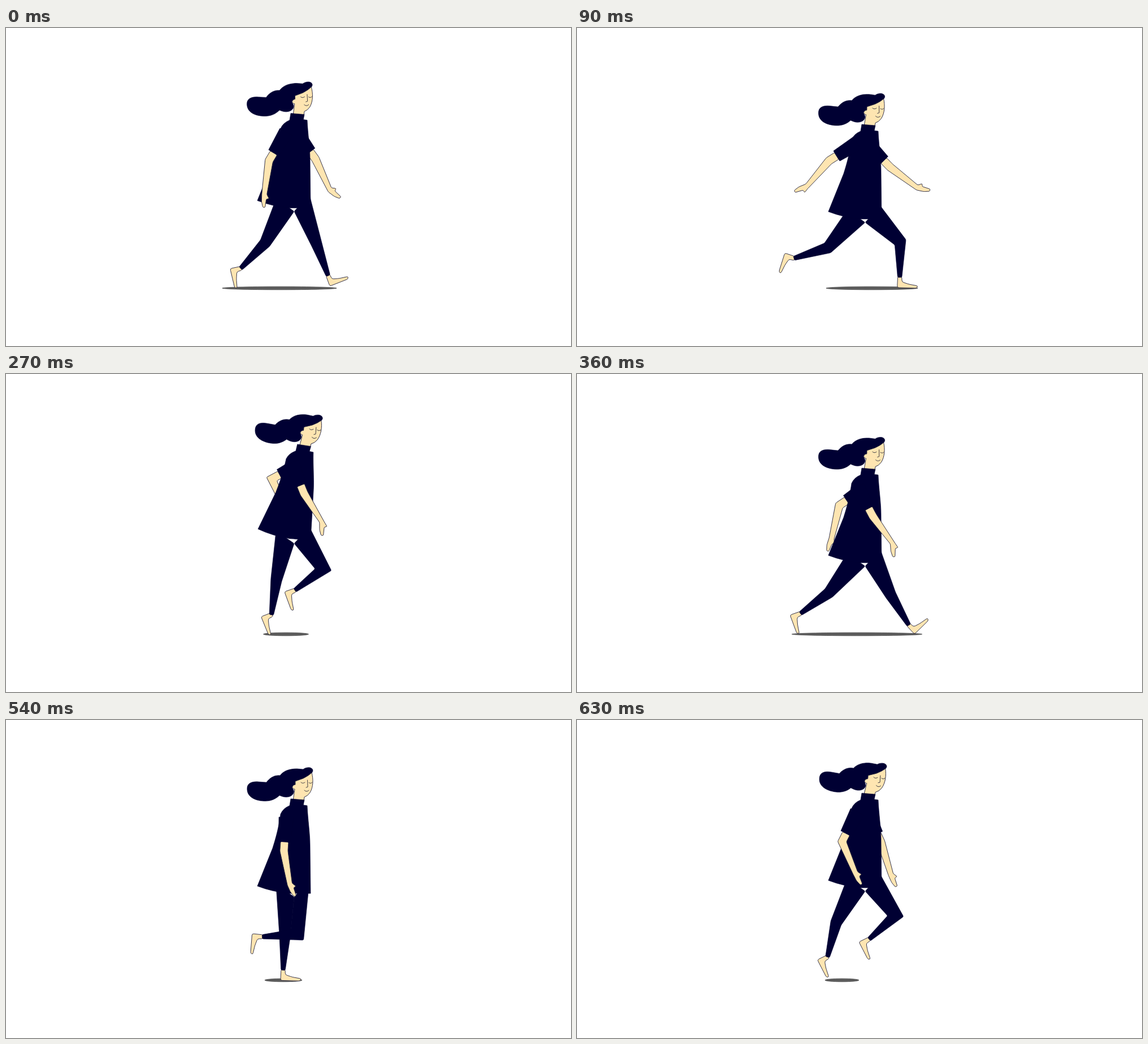
An HTML page that plays this animation: 998x561 px, repeating every 0.72 s.

```html
<!DOCTYPE html>
<html lang="en">
<head>
<meta charset="utf-8">
<title>Walk cycle</title>
<style>
  html, body { margin: 0; width: 100%; height: 100%; overflow: hidden; background: #fff; }
  svg { display: block; width: 100%; height: 100%; }
  .navy { fill: #000033; stroke: #000033; stroke-width: .6; stroke-linejoin: round; }
  .skin { fill: #fee5b1; stroke: #22223c; stroke-width: .9; stroke-linejoin: round; }
  .line { fill: none; stroke: #33333f; stroke-width: .9; stroke-linecap: round; }
  #shadow { fill: #5c5c5c; stroke: #444; stroke-width: .7; }
</style>
</head>
<body>
<svg viewBox="0 0 998 561">
  <ellipse id="shadow" cy="459" ry="2.8"/>
  <g id="figure">
    <g class="torso">
      <path id="farArm" class="skin"/>
      <path id="farSleeve" class="navy"/>
    </g>
    <path id="backFoot" class="skin"/>
    <path id="frontFoot" class="skin"/>
    <path id="backLeg" class="navy"/>
    <path id="frontLeg" class="navy"/>
    <g class="torso">
      <g id="head">
        <path class="navy" d="M426 123C425 112 433 108 446 109L460 110C466 102 474 97 484 98C490 90 500 86 514 86L525 87C530 83 541 82 542 89C542 93 536 99 525 104L512 109L511 117L505 118L508 124C510 130 504 136 495 136C490 136 486 134 483 133C476 140 467 143 458 143C444 143 427 138 426 123Z"/>
        <path class="skin" d="M511 108L525 103Q535 98 540 93C543 104 543 118 537 128Q533 134 527 136L525 150L506 150L510 122C505 122 504 115 511 114Z"/>
        <path class="line" d="M521 110Q524 113 528 110M535 110.500Q538 113 541 110M532.500 106L533 118L530 119M527 124Q531 128 535 124"/>
      </g>
      <path class="navy" d="M503 139L527 141L525 150L532 151C533 175 537 200 537 220L538 306L500 306Q470 303 444 293L471 226C480 198 483 180 485 166Q489 156 501 151Z"/>
      <path id="nearArm" class="skin"/>
      <path id="nearSleeve" class="navy"/>
    </g>
  </g>
</svg>
<script>
const STEP = 90;
const HIP = [502, 291], HIP_BACK = [477, 290], CROTCH = [509, 312], HIP_FRONT = [536, 283];
const SHOULDER = { near: [495, 172], far: [512, 172] };
const THIGH = 89, SHIN = 62, SLEEVE = 43, UPPER_ARM = 59, FOREARM = 60;

// Outlines as [across, along] from the ankle and the wrist
const FOOT = [[3.5, -2], [4, 8], [16, 12], [32, 15], [30, 19], [-4.5, 18], [-3.5, -2]];
const HAND = [[4.5, 0], [9, 7], [4, 8], [3, 23], [-1, 23], [-4, 13], [-4.5, 0]];

// Limb angles are degrees from straight down, forward positive.
// Legs: thigh, shin, foot pitch. Arms: upper arm, forearm, hand.
const contact = {
  drop: 11.5, lean: 0, tilt: -1, shadow: [483, 101],
  back: [-30, -44, 75], front: [31, 20, -23],
  near: [-31, -8, -4], far: [36, 25, 51]
};
const down = {
  drop: 31, lean: 0, tilt: 2, shadow: [521, 81],
  back: [-42, -73, 106], front: [51, -1, 0],
  near: [-58, -41, -70], far: [44, 53, 76]
};
const passing = {
  drop: 0, lean: 0, tilt: 0, shadow: [490, 33],
  back: [-6, -3, 0], front: [8, -87, 93],
  near: [-4, 10, 22], far: [0, 5, 10]
};
const rise = {
  drop: -13, lean: 4, tilt: 2.5, shadow: [494.5, 40],
  back: [-16, -8, 66], front: [41, -54, 68],
  near: [26, 36, 2], far: [-58, 29, 29]
};
const reach = {
  drop: 27, lean: 0, tilt: 2, shadow: [494.5, 115],
  back: [-40, -54, 68], front: [36, 31, -46],
  near: [28, 36, 2], far: [-56, -13, -20]
};
const push = {
  drop: -10, lean: 0, tilt: 6, shadow: [468, 30],
  back: [-30, -14, 61], front: [43, -49, 61],
  near: [-27, 23, 25], far: [25, 17, 22]
};
const downSwap = { ...down, near: down.far, far: down.near };

const cycle = [contact, down, passing, rise, reach, downSwap, passing, push];

const $ = id => document.getElementById(id);
const rad = deg => deg * Math.PI / 180;

// Point at a distance along and across a bone's direction
function at([x, y], deg, along, across = 0) {
  const s = Math.sin(rad(deg)), c = Math.cos(rad(deg));
  return [x + along * s + across * c, y + along * c - across * s];
}

// Front and back edge of a joint between two bones
function edges(p, a, b, half) {
  const w = half / Math.cos(rad(a - b) / 2);
  return [at(p, (a + b) / 2, 0, w), at(p, (a + b) / 2, 0, -w)];
}

const place = (shape, p, deg) => shape.map(([across, along]) => at(p, deg, along, across));

// Closed polygon with softened corners
function outline(pts, r) {
  const n = pts.length;
  const toward = (a, b) => {
    const k = Math.min(r / Math.hypot(b[0] - a[0], b[1] - a[1]), .5);
    return [a[0] + (b[0] - a[0]) * k, a[1] + (b[1] - a[1]) * k];
  };
  return pts.map((p, i) => {
    const from = toward(p, pts[(i + n - 1) % n]);
    const to = toward(p, pts[(i + 1) % n]);
    return `${i ? "L" : "M"}${from}Q${p} ${to}`;
  }).join("") + "Z";
}

const setPath = (id, pts, r) => $(id).setAttribute("d", outline(pts, r));

function drawLeg(side, [thigh, shin, pitch], hipFront, hipBack) {
  const knee = at(HIP, thigh, THIGH);
  const ankle = at(knee, shin, SHIN);
  const [kneeFront, kneeBack] = edges(knee, thigh, shin, 9.8);
  const [ankleFront, ankleBack] = edges(ankle, shin, shin, 3.7);
  setPath(side + "Leg", [hipFront, kneeFront, ankleFront, ankleBack, kneeBack, hipBack], 2);
  setPath(side + "Foot", place(FOOT, ankle, -pitch), 3);
}

function drawArm(side, [upper, fore, hand]) {
  const shoulder = SHOULDER[side];
  const cuff = at(shoulder, upper, SLEEVE);
  const elbow = at(shoulder, upper, UPPER_ARM);
  const wrist = at(elbow, fore, FOREARM);
  const [cuffFront, cuffBack] = edges(cuff, upper, upper, 7);
  const [elbowFront, elbowBack] = edges(elbow, upper, fore, 7);
  setPath(side + "Arm", [cuffFront, elbowFront, ...place(HAND, wrist, hand), elbowBack, cuffBack], 2);
  const [rootFront, rootBack] = edges(shoulder, upper, upper, 13);
  const [hemFront, hemBack] = edges(cuff, upper, upper, 10.5);
  setPath(side + "Sleeve", [rootFront, hemFront, hemBack, rootBack], .5);
}

function draw(pose) {
  drawLeg("back", pose.back, CROTCH, HIP_BACK);
  drawLeg("front", pose.front, HIP_FRONT, CROTCH);
  drawArm("near", pose.near);
  drawArm("far", pose.far);
  $("figure").setAttribute("transform", `translate(0 ${pose.drop})`);
  for (const g of document.querySelectorAll(".torso")) {
    g.setAttribute("transform", `rotate(${pose.lean} 538 306)`);
  }
  $("head").setAttribute("transform", `rotate(${pose.tilt} 515 139)`);
  $("shadow").setAttribute("cx", pose.shadow[0]);
  $("shadow").setAttribute("rx", pose.shadow[1]);
}

let shown = -1;
function tick() {
  const i = Math.floor(performance.now() / STEP) % cycle.length;
  if (i !== shown) draw(cycle[shown = i]);
  requestAnimationFrame(tick);
}
tick();
</script>
</body>
</html>
```
